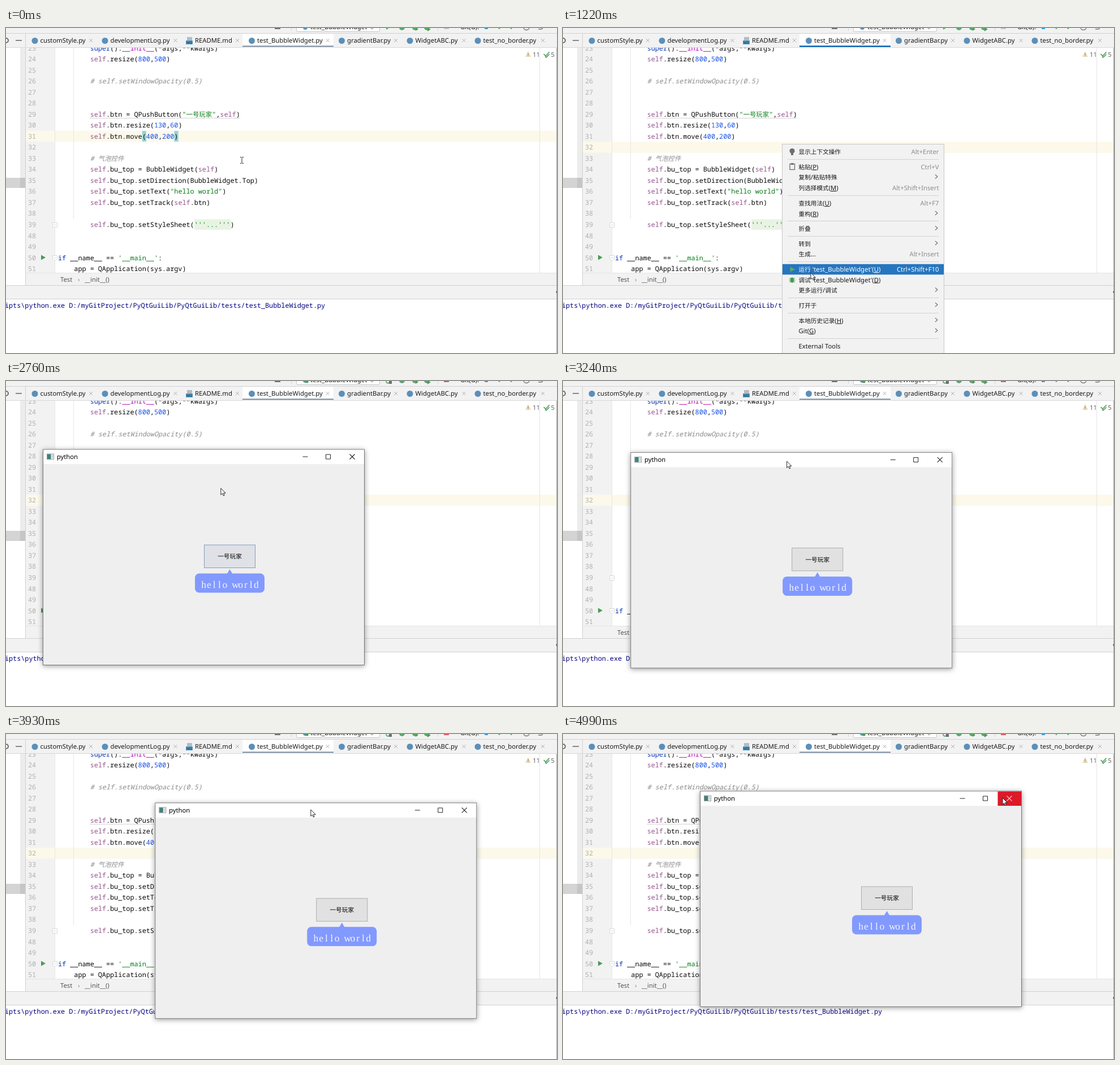
These frames come from a looping animation (974x575 px, 5030 ms). An HTML page:

```html
<!DOCTYPE html>
<html lang="zh">
<head>
<meta charset="utf-8">
<title>Bubble widget demo</title>
<style>
html, body { margin: 0; width: 100%; height: 100%; overflow: hidden; background: #fff; }
svg { display: block; width: 974px; height: 575px; }
text { white-space: pre; text-rendering: geometricPrecision;
  font: 11.3px "Noto Sans", "Noto Sans CJK SC", sans-serif; }
text.code { font: 11.8px "Noto Sans Mono", "Noto Sans CJK SC", monospace; }
text.bubble { font: 17.5px "Liberation Serif", serif; text-anchor: middle; }
.item.on text { fill: #fff; }
</style>
</head>
<body>
<svg id="stage" viewBox="0 0 974 575">
  <defs>
    <filter id="shadow" x="-10%" y="-10%" width="120%" height="120%">
      <feDropShadow dx="0" dy="2" stdDeviation="5" flood-opacity=".4"/>
    </filter>
  </defs>
</svg>
<script>
const NS = 'http://www.w3.org/2000/svg';
const LOOP = 5030, CHAR = 7.08, ROW = 19.53;
const stage = document.getElementById('stage');

function el(parent, tag, attrs = {}) {
  const node = document.createElementNS(NS, tag);
  for (const k in attrs) node.setAttribute(k, attrs[k]);
  parent.append(node);
  return node;
}
const group = (p, attrs) => el(p, 'g', attrs);
const rect = (p, x, y, width, height, fill, more) => el(p, 'rect', { x, y, width, height, fill, ...more });
const path = (p, d, stroke, more) => el(p, 'path', { d, fill: 'none', stroke, ...more });
const shape = (p, d, fill) => el(p, 'path', { d, fill });
const dot = (p, cx, cy, r, fill) => el(p, 'circle', { cx, cy, r, fill });

// Chinese runs get their own size; "_X" inside "(_X)" marks an underlined mnemonic.
function addRuns(node, str, size, attrs = {}) {
  for (const run of str.match(/[\u4e00-\u9fff]+|[^\u4e00-\u9fff]+/g) || []) {
    const cjk = run.charCodeAt(0) >= 0x4e00;
    el(node, 'tspan', cjk ? { ...attrs, style: `font-size:${size}px` } : attrs).textContent = run;
  }
}
function label(p, x, y, str, fill = '#1a1a1a', more = {}) {
  const node = el(p, 'text', { x, y, fill, ...more });
  const m = str.match(/^(.*\()_(\w)(\))$/);
  if (!m) addRuns(node, str, 10.65);
  else {
    addRuns(node, m[1], 10.65);
    addRuns(node, m[2], 10.65, { 'text-decoration': 'underline' });
    addRuns(node, m[3], 10.65);
  }
  return node;
}

const TOKENS = /(?<note>#.*)|(?<str>"[^"]*"|'[^:)]*')|(?<self>\bself\b)|(?<magic>__init__)|(?<key>\bif\b|\bsuper\b)|(?<num>\d+\.?\d*)/g;
const COLORS = { note: '#8c8c8c', str: '#067d17', self: '#94558d', magic: '#b200b2', key: '#0033b3', num: '#1750eb' };
function code(p, x, y, str, fill = '#080808') {
  const node = el(p, 'text', { x, y, fill, class: 'code' });
  let at = 0;
  for (const m of str.matchAll(TOKENS)) {
    addRuns(node, str.slice(at, m.index), 11.4);
    const kind = Object.keys(COLORS).find(k => m.groups[k]);
    addRuns(node, m[0], 11.4, { fill: COLORS[kind], ...(kind === 'note' && { 'font-style': 'italic' }) });
    at = m.index + m[0].length;
  }
  addRuns(node, str.slice(at), 11.4);
}

// ---- editor ----
const LINES = [
  [23, 8, 'super().__init__(*args,**kwargs)'], [24, 8, 'self.resize(800,500)'], [25, 0, ''],
  [26, 8, '# self.setWindowOpacity(0.5)'], [27, 0, ''], [28, 0, ''],
  [29, 8, 'self.btn = QPushButton("一号玩家",self)'], [30, 8, 'self.btn.resize(130,60)'],
  [31, 8, 'self.btn.move(400,200)'], [32, 0, ''], [33, 8, '# 气泡控件'],
  [34, 8, 'self.bu_top = BubbleWidget(self)'], [35, 8, 'self.bu_top.setDirection(BubbleWidget.Top)'],
  [36, 8, 'self.bu_top.setText("hello world")'], [37, 8, 'self.bu_top.setTrack(self.btn)'], [38, 0, ''],
  [39, 8, "self.bu_top.setStyleSheet('''...''')"], [48, 0, ''], [49, 0, ''],
  [50, 0, "if __name__ == '__main__':"], [51, 4, 'app = QApplication(sys.argv)']
];
const rowY = i => 35.5 + i * ROW;

rect(stage, 0, 0, 974, 575, '#fff');
rect(stage, 25, 34, 9, 231, '#ececec');
rect(stage, 0, 265, 25, 18, '#d4d4d4');
rect(stage, 25, 265, 9, 18, '#c6c6c6');
rect(stage, 35, 34, 51, 400, '#f2f2f2');
const activeRow = rect(stage, 35, 181.7, 938, 19.5, '#fcf9ea');
path(stage, 'M86.5 34V434M119.5 34V338M943.5 34V434', '#e6e6e6');
path(stage, 'M34.5 34V455', '#d0d0d0');
const parens = group(stage);
for (const x of [240.7, 297.4]) rect(parens, x, 182, 7.2, 19, '#93d5d9');
rect(stage, 333, 338.5, 64.5, 18.5, '#e9f3e4');
path(stage, 'M148 159.5H413', '#c8c8c8', { 'stroke-width': .8 });

LINES.forEach(([n, col, str], i) => {
  const y = rowY(i) + 4;
  el(stage, 'text', { x: 39, y, fill: '#b0b0b0', class: 'code' }).textContent = n;
  if (str) code(stage, 92 + col * CHAR, y, str);
});
const caret = rect(stage, 91, 203, 2, 15.5, '#000');
shape(stage, 'M62 401.5L70 406L62 410.5Z', '#499c54');
path(stage, 'M82.5 344.5H90.5V352.5H82.5ZM84.5 348.5H88.5M82.5 402.5H90.5V408L86.5 412L82.5 408ZM84.5 406.5H88.5',
  '#d8d8d8', { fill: '#fff' });

shape(stage, 'M923 41L928 51H918Z', '#e9dcbd');
path(stage, 'M923 44.5V48M923 49V50', '#8a7242');
label(stage, 931, 51, '11', '#6a6a6a');
path(stage, 'M950.5 46L954 49.5L960.5 42.5M953 50.5L955 52L960.5 46.5', '#4c9f56', { 'stroke-width': 1.7 });
label(stage, 963.3, 51, '5', '#6a6a6a');

// ---- panels below ----
rect(stage, 35, 434, 938, 21, '#f2f2f2');
path(stage, 'M35 433.5H973', '#e4e4e4');
label(stage, 96, 449, 'Test', '#555');
label(stage, 127, 448.5, '›', '#888');
label(stage, 139, 449, '__init__()', '#555');
rect(stage, 0, 456, 974, 23, '#f2f2f2');
path(stage, 'M0 455.5H974M0 479.5H974', '#d1d1d1');
code(stage, 111.2 - 16 * CHAR, 494.5, 'ipts\\python.exe D:/myGitProject/PyQtGuiLib/PyQtGuiLib/tests/test_BubbleWidget.py', '#000080');
path(stage, 'M973.5 34V575', '#a5a5a5');
dot(stage, 974, 467, 1.8, '#555');

// ---- toolbar and tabs ----
rect(stage, 0, 0, 974, 34, '#f2f2f2');
path(stage, 'M0 9.5H974', '#d1d1d1');
path(stage, 'M504.5 0V5M763.5 0V5', '#d5d5d5');
rect(stage, 475, 0, 10, 2, '#6e6e6e');
rect(stage, 513.5, -10, 147, 16.5, '#fff', { stroke: '#c4c4c4', rx: 2 });
dot(stage, 529, -1, 4, '#5b8fb9');
label(stage, 538, 2, 'test_BubbleWidget');
path(stage, 'M644 -1L647 2L650 -1', '#777');
for (const x of [700, 723, 744]) dot(stage, x, -1, 5, '#59a869');
shape(stage, 'M724 0L729 2L724 5ZM745 0L751 2L745 6Z', '#499c54');
const idle = group(stage), running = group(stage);
shape(idle, 'M672 0H677L672 3Z', '#59a869');
rect(idle, 774, 0, 9, 2, '#c4c4c4');
dot(running, 532, 1, 2.6, '#3fa63f');
path(running, 'M672 0C672 5 677 5 678 1', '#59a869', { 'stroke-width': 1.6 });
rect(running, 677, 0, 5, 5, '#6e6e6e');
rect(running, 774, 0, 9, 2, '#db5860');
label(stage, 803, 1.5, 'Git(G):');
path(stage, 'M846 1H852', '#389fd6', { 'stroke-width': 2 });
path(stage, 'M869 -2L872 1L876 -3M890 -2L893 1L897 -3', '#59a869', { 'stroke-width': 1.6 });
path(stage, 'M915 -1A5 4.5 0 0 0 925 -1M941 2H946C949 2 949 -2 947 -3', '#7a7a7a', { 'stroke-width': 1.4 });

path(stage, 'M17 22H28', '#6e6e6e', { 'stroke-width': 1.6 });
path(stage, 'M0 18A4 4 0 0 1 0 26', '#6e6e6e', { 'stroke-width': 2 });
path(stage, 'M34.5 10V34', '#d1d1d1');
rect(stage, 418, 10, 161, 24, '#fff');
path(stage, 'M0 34.5H418M579 34.5H974', '#d8d8d8');
const tabLine = rect(stage, 418, 31, 161, 3, '#9aa7b5');
const TABS = [
  [60.5, 150, 'customStyle.py'], [184.5, 299.5, 'developmentLog.py'], [334, 409, 'README.md'],
  [444, 568.5, 'test_BubbleWidget.py'], [603, 689, 'gradientBar.py'], [723.5, 809.5, 'WidgetABC.py'],
  [843.5, 949, 'test_no_border.py']
];
for (const [x, close, name] of TABS) {
  if (name.endsWith('.md')) {
    rect(stage, x - 14, 16, 9, 12, '#b4bcc3');
    rect(stage, x - 16, 22, 12, 7, '#5aa5d0');
    label(stage, x - 15.3, 28, 'MD', '#244a63', { style: 'font-size:6.5px;font-weight:700' });
  } else dot(stage, x - 9.5, 22.5, 5.5, '#5b8fb9');
  label(stage, x, 26, name);
  path(stage, `M${close - 3} 19l6 6m0 -6l-6 6`, '#b0b0b0');
}

// ---- context menu ----
const ITEMS = [
  [219, '显示上下文操作', 'Alt+Enter'], [245.5, '粘贴(_P)', 'Ctrl+V'], [264, '复制/粘贴特殊', '>'],
  [283, '列选择模式(_M)', 'Alt+Shift+Insert'], [310, '查找用法(_U)', 'Alt+F7'], [328.5, '重构(_R)', '>'],
  [355, '折叠', '>'], [381.5, '转到', '>'], [400, '生成...', 'Alt+Insert'],
  [427, "运行 'test_BubbleWidget'(_U)", 'Ctrl+Shift+F10'], [445.5, "调试 'test_BubbleWidget'(_D)", ''],
  [464, '更多运行/调试', '>'], [490.5, '打开于', '>'], [517.5, '本地历史记录(_H)', '>'],
  [536, 'Git(_G)', '>'], [562.5, 'External Tools', '']
];
const menu = group(stage);
rect(menu, 387.5, 205.5, 286, 380, '#f2f2f2', { stroke: '#c6c6c6' });
for (const y of [232.5, 296.5, 341.5, 368.5, 413.5, 477.5, 504.5, 549.5]) path(menu, `M397 ${y}H664`, '#d2d2d2');
const hover = rect(menu, 388, 0, 285, 18.6, '#2675bf');
const items = ITEMS.map(([y, name, key]) => {
  const g = group(menu, { class: 'item' });
  label(g, 416.5, y + 4, name);
  if (key === '>') path(g, `M658 ${y - 4.5}l4 3.5l-4 3.5`, '#6e6e6e', { 'stroke-width': 1.1 });
  else label(g, 664.5, y + 4, key, '#8c8c8c', { 'text-anchor': 'end' });
  return { y, g };
});
dot(menu, 405, 217.5, 4.6, '#6e6e6e');
rect(menu, 403, 221, 4, 4, '#6e6e6e');
rect(menu, 401, 240.5, 8.5, 10, 'none', { stroke: '#6e6e6e', 'stroke-width': 1.3 });
rect(menu, 403, 239, 4.5, 3, '#6e6e6e');
shape(menu, 'M401.5 422.5L410.5 427L401.5 431.5Z', '#59a869');
path(menu, 'M400 442L410 450M400 450L410 442M399.5 446H410.5', '#499c54');
el(menu, 'ellipse', { cx: 405, cy: 446, rx: 3.4, ry: 4.8, fill: '#499c54' });

// ---- demo window, drawn from its own top left corner ----
const win = group(stage);
rect(win, 0, 0, 569, 382, '#efefef', { filter: 'url(#shadow)' });
rect(win, 0, 0, 569, 26.5, '#fff');
const maxBack = rect(win, 485, 1, 41.5, 25.5, '#e5e5e5');
const closeBack = rect(win, 526.5, 1, 42, 25.5, '#dc1a28');
rect(win, .5, .5, 568, 381.5, 'none', { stroke: '#777' });
rect(win, 7.5, 8.5, 12, 9.5, '#f5f5f5', { stroke: '#9a9a9a' });
rect(win, 8, 9, 6.5, 8.5, '#3f8079');
rect(win, 16, 10, 2, 6, '#c9c9c9');
label(win, 24.7, 17.3, 'python', '#000');
path(win, 'M459.5 13.5H468.5M500.5 9.5H508.5V17.5H500.5Z', '#222');
const closeMark = path(win, 'M542.5 9L551.5 18M551.5 9L542.5 18', '#222', { 'stroke-width': 1.1 });
const button = rect(win, 285.5, 169.5, 90, 40.5, '#e1e1e1', { stroke: '#adadad' });
label(win, 330.5, 193.8, '一号玩家', '#000', { 'text-anchor': 'middle' });
rect(win, 269, 220, 123, 34, '#8299ff', { rx: 7.5 });
shape(win, 'M330.5 212.5L335.5 221H325.5Z', '#8299ff');
const cells = [...'hello world'].map((c, i) => (284.7 + i * 9.27).toFixed(1));
el(win, 'text', { x: cells.join(' '), y: 245.5, fill: '#f4f5ff', class: 'bubble' }).textContent = 'hello world';

// ---- pointer ----
const pointer = group(stage);
const beam = path(pointer, 'M-3 -5.5H-.7M.7 -5.5H3M0 -5V5M-3 5.5H-.7M.7 5.5H3', '#222');
const arrow = path(pointer, 'M0 0V11.6L2.7 9.2L4.5 13.2L6.3 12.4L4.6 8.5H8.3Z', '#111', { fill: '#fff', 'stroke-width': .9 });

// ---- motion ----
const MENU_OPEN = 720, MENU_CLOSE = 1540, RUN = 1830, WIN_OPEN = 2310, GRAB = 3080, DROP = 4220;
const WIN_PATH = [
  [GRAB, 65, 120.5], [3160, 77, 123], [3300, 150, 128], [3400, 215, 122], [3490, 260, 116], [3580, 283, 113],
  [3690, 284, 120], [3780, 325, 131], [3860, 300, 129], [3930, 263.5, 121.5], [4040, 236, 105], [DROP, 242, 100.5]
];
const GRIP = [[GRAB, 276, 15.5], [3490, 277, 17], [3930, 275.5, 12.5], [DROP, 288, 19]];
const BEFORE = [
  [40, 417, 234], [280, 326, 205], [450, 326, 205], [690, 387, 205], [800, 388, 206], [1010, 402, 280],
  [1220, 438, 433], [1560, 438, 433], [1900, 445, 365], [2030, 445, 359], [2150, 445, 359],
  [2590, 388, 222], [2760, 380, 190], [3000, 341, 136], [GRAB, 341, 136]
];
const AFTER = [[4260, 530, 119.5], [4480, 592, 132], [4780, 766, 119], [4820, 770, 117], [4990, 777, 113]];

function along(keys, t) {
  const i = keys.findIndex(k => k[0] > t);
  if (i === 0) return keys[0].slice(1);
  if (i < 0) return keys[keys.length - 1].slice(1);
  const [a, b] = [keys[i - 1], keys[i]], f = (t - a[0]) / (b[0] - a[0]);
  return [a[1] + (b[1] - a[1]) * f, a[2] + (b[2] - a[2]) * f];
}
const show = (node, on) => node.setAttribute('visibility', on ? 'visible' : 'hidden');
const move = (node, x, y) => node.setAttribute('transform', `translate(${x.toFixed(2)} ${y.toFixed(2)})`);
const mix = (a, b, f) => `rgb(${a.map((v, i) => Math.round(v + (b[i] - v) * f))})`;

function draw(t) {
  const [wx, wy] = along(WIN_PATH, t);
  let [px, py] = along(t < GRAB ? BEFORE : AFTER, t);
  if (t >= GRAB && t < DROP) {
    const [gx, gy] = along(GRIP, t);
    px = wx + gx;
    py = wy + gy;
  }
  const clicked = t >= MENU_OPEN, menuOn = clicked && t < MENU_CLOSE, winOn = t >= WIN_OPEN;

  activeRow.setAttribute('y', clicked ? 201.3 : 181.7);
  show(parens, !clicked);
  show(caret, t >= MENU_CLOSE && !winOn);
  tabLine.setAttribute('fill', clicked && !winOn ? '#2675bf' : '#9aa7b5');
  show(idle, t < RUN);
  show(running, t >= RUN);

  show(menu, menuOn);
  const active = items.find(it => Math.abs(it.y - py) < 9.3);
  for (const it of items) it.g.classList.toggle('on', it === active);
  show(hover, menuOn && active);
  if (active) hover.setAttribute('y', active.y - 9.3);

  show(win, winOn);
  move(win, wx, wy);
  const f = Math.min(1, Math.max(0, (t - 2700) / 250));
  button.setAttribute('fill', mix([222, 225, 231], [225, 225, 225], f));
  button.setAttribute('stroke', mix([120, 150, 195], [173, 173, 173], f));
  const free = t > DROP && py < wy + 26.5, rx = px - wx;
  const onClose = free && rx >= 526.5;
  show(maxBack, free && rx >= 485 && !onClose);
  show(closeBack, onClose);
  closeMark.setAttribute('stroke', onClose ? '#f6c9cc' : '#222');

  const arrowOn = menuOn || winOn;
  show(arrow, arrowOn);
  show(beam, !arrowOn);
  move(pointer, px, py);
}

const start = performance.now();
function tick() {
  draw((performance.now() - start) % LOOP);
  requestAnimationFrame(tick);
}
tick();
</script>
</body>
</html>
```
